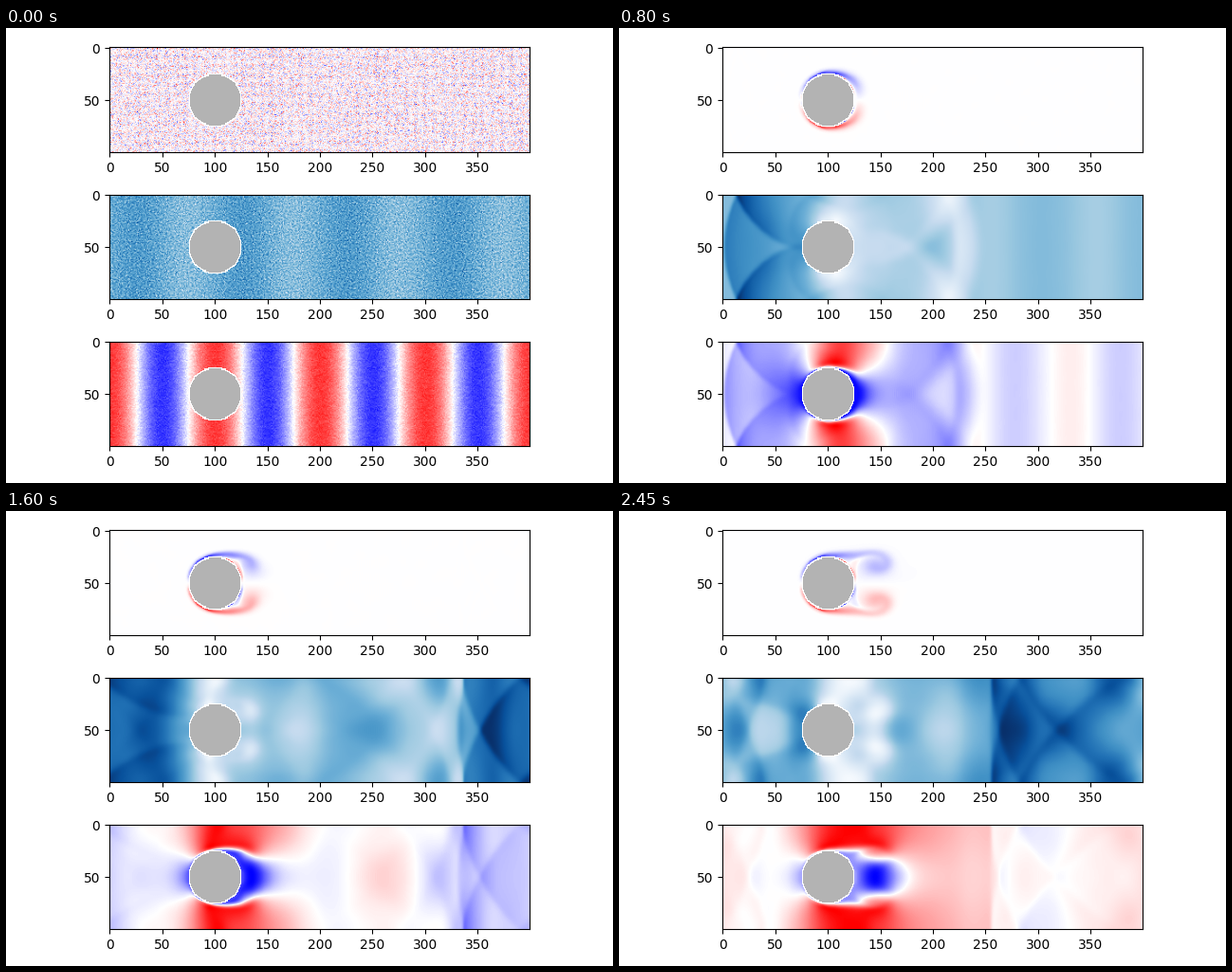
These frames come from a looping animation (640x480 px, 2500 ms). A matplotlib script:

```python
"""Lattice Boltzmann flow past a cylinder: vorticity, density and x-velocity."""
import numpy as np
import matplotlib.pyplot as plt
from matplotlib.animation import FuncAnimation

NX, NY = 400, 100
RHO0 = 100
TAU = 0.6
FRAMES = 50
STEPS_PER_FRAME = 10

# D2Q9 lattice
CX = np.array([0, 0, 1, 1, 1, 0, -1, -1, -1])
CY = np.array([0, 1, 1, 0, -1, -1, -1, 0, 1])
W = np.array([4/9, 1/9, 1/36, 1/9, 1/36, 1/9, 1/36, 1/9, 1/36])
OPPOSITE = [0, 5, 6, 7, 8, 1, 2, 3, 4]

X, Y = np.meshgrid(np.arange(NX), np.arange(NY))
cylinder = (X - NX / 4)**2 + (Y - NY / 2)**2 < (NY / 4)**2


def initial_state():
    np.random.seed(42)
    f = np.ones((NY, NX, 9)) + 0.01 * np.random.randn(NY, NX, 9)
    f = np.ascontiguousarray(f.transpose(2, 0, 1))
    f[3] += 2 * (1 + 0.2 * np.cos(2 * np.pi * X / NX * 4))
    return f * (RHO0 / f.sum(axis=0))


def drift(f):
    for i in range(1, 9):
        f[i] = np.roll(f[i], (CY[i], CX[i]), axis=(0, 1))


def moments(f):
    rho = f.sum(axis=0)
    ux = (f[2] + f[3] + f[4] - f[6] - f[7] - f[8]) / rho
    uy = (f[1] + f[2] + f[8] - f[4] - f[5] - f[6]) / rho
    return rho, ux, uy


def collide(f, rho, ux, uy):
    bounced = f[:, cylinder][OPPOSITE]
    base = 1 - 1.5 * (ux**2 + uy**2)
    for i in range(9):
        cu = CX[i] * ux + CY[i] * uy
        feq = rho * W[i] * (base + 3 * cu + 4.5 * cu**2)
        f[i] += (feq - f[i]) / TAU
    f[:, cylinder] = bounced


def curl(ux, uy):
    dux = np.roll(ux, -1, axis=0) - np.roll(ux, 1, axis=0)
    duy = np.roll(uy, -1, axis=1) - np.roll(uy, 1, axis=1)
    return dux - duy


def simulate():
    f = initial_state()
    shots = []
    for step in range((FRAMES - 1) * STEPS_PER_FRAME + 1):
        drift(f)
        rho, ux, uy = moments(f)
        if step % STEPS_PER_FRAME == 0:
            shots.append([np.ma.array(a, mask=cylinder)
                          for a in (curl(ux, uy), rho, ux)])
        collide(f, rho, ux, uy)
    return shots


shots = simulate()

fig, axes = plt.subplots(3, figsize=(6.4, 4.8), dpi=100)
fig.tight_layout()

disc = np.ma.array(np.zeros((NY, NX)), mask=~cylinder)
images = []
for ax, data, cmap in zip(axes, shots[0], ("bwr", "Blues", "bwr")):
    images.append(ax.imshow(data, cmap=cmap))
    ax.imshow(disc, cmap="gray", vmin=0, vmax=1, alpha=0.3)


def update(frame):
    for image, data in zip(images, shots[frame]):
        image.set_data(data)
        image.autoscale()
    return images


anim = FuncAnimation(fig, update, frames=FRAMES, interval=50, repeat=True)
plt.show()
```
